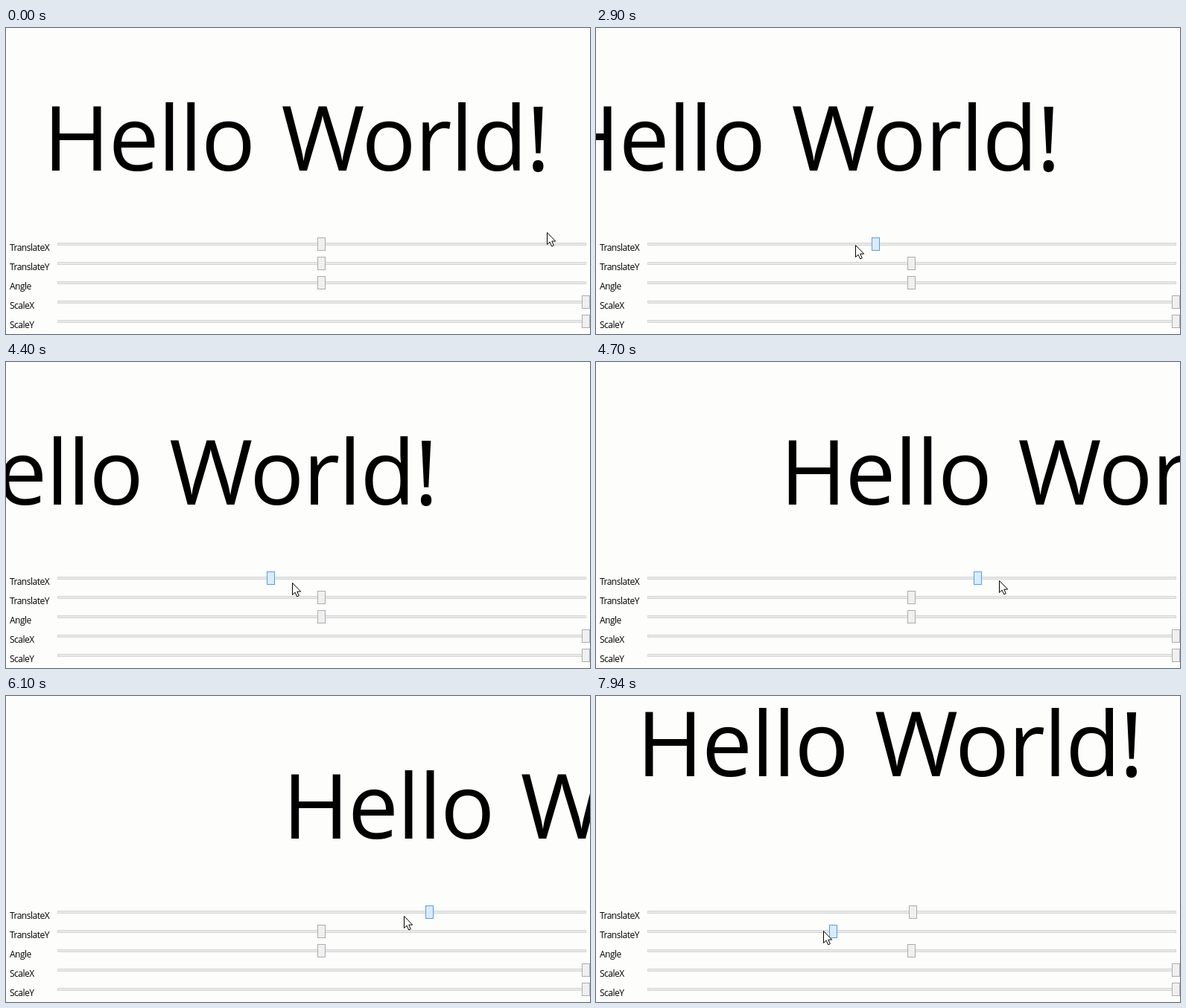
These frames come from a looping animation (784 by 412 pixels, 8 s). An HTML page with a canvas:

```html
<!DOCTYPE html>
<html lang="en">
<head>
<meta charset="utf-8">
<title>Transform sliders</title>
<style>
html, body { margin: 0; width: 100%; height: 100%; overflow: hidden; background: #fdfdfc; }
canvas { display: block; width: 784px; height: 412px; }
</style>
</head>
<body>
<canvas id="stage" width="784" height="412"></canvas>
<script>
const W = 784, H = 412, LOOP = 8000, LAST = 7940;
const HOME = 423.5, HALF = 355;
const LEAD = 70; // the pointer runs this many ms ahead of the dragged thumb
const ctx = document.getElementById('stage').getContext('2d');
const sliders = ['TranslateX', 'TranslateY', 'Angle', 'ScaleX', 'ScaleY'];

// A value that rests between eased strokes [from time, to time, new value].
function strokes(first, ...list) {
  return t => list.reduce((value, [t0, t1, to]) => {
    const u = Math.min(1, Math.max(0, (t - t0) / (t1 - t0)));
    return value + (to - value) * (1 - Math.cos(Math.PI * u)) / 2;
  }, first);
}

const thumbX = strokes(HOME, [2570, 3680, 186], [3808, 5343, 707], [5680, 6569, 406], [6640, 7198, 425.5]);
const thumbY = strokes(HOME, [7480, 8080, 303]);

// Pointer offset from the thumb, and its height on the stage.
const gripX = strokes(303.5, [30, 830, 231], [830, 1250, -412], [1300, 1800, -6], [5340, 5680, 3], [7200, 7480, -3.5]);
const pointerY = strokes(275, [30, 830, 106], [900, 1600, 312], [1600, 1830, 289], [2570, 3430, 297],
  [4400, 5100, 290], [5100, 5340, 296], [7150, 7480, 316]);

function box(x, y, w, h, fill, line) {
  ctx.fillStyle = line;
  ctx.fillRect(x, y, w, h);
  ctx.fillStyle = fill;
  ctx.fillRect(x + 1, y + 1, w - 2, h - 2);
}

function drawTitle(dx, dy) {
  ctx.font = '121px "Open Sans", "Noto Sans", sans-serif';
  ctx.letterSpacing = '-1.6px';
  ctx.fillStyle = '#000';
  ctx.fillText('Hello', 50 + dx, 192 + dy);
  ctx.fillText('World!', 369.5 + dx, 192 + dy);
}

function drawSlider(i, center, active) {
  const mid = 291 + 26 * i;
  ctx.font = '12px "Open Sans", "Noto Sans", sans-serif';
  ctx.letterSpacing = '-0.5px';
  ctx.fillStyle = '#000';
  ctx.fillText(sliders[i], 5, mid + 9);
  box(69, mid - 2, 710, 4, '#e7eaea', '#d6d6d6');
  const left = Math.round(center - 5.5);
  if (active) box(left, mid - 9, 11, 18, '#daecfc', '#569de5');
  else box(left, mid - 9, 11, 18, '#f0f0f0', '#acacac');
}

function drawPointer(x, y) {
  const arrow = [[0, 0], [0, 16], [3.6, 12.6], [6.2, 18.4], [8.8, 17.3], [6.3, 11.6], [11.2, 11.6]];
  ctx.beginPath();
  for (const [px, py] of arrow) ctx.lineTo(x + px - 0.5, y + py + 0.5);
  ctx.closePath();
  ctx.fillStyle = '#fff';
  ctx.fill();
  ctx.strokeStyle = '#000';
  ctx.lineWidth = 1;
  ctx.stroke();
}

function draw(t) {
  const sx = thumbX(t), sy = thumbY(t);
  ctx.fillStyle = '#fdfdfc';
  ctx.fillRect(0, 0, W, H);
  drawTitle((sx - HOME) * W / HALF, (sy - HOME) * 0.8);
  const centers = [sx, sy, HOME, 778.5, 778.5];
  const active = t >= 7430 ? 1 : t >= 2540 && t < 7200 ? 0 : -1;
  centers.forEach((c, i) => drawSlider(i, c, i === active));
  const x = thumbX(t + LEAD) + thumbY(t + LEAD) - HOME + gripX(t);
  drawPointer(Math.round(x), Math.round(pointerY(t)));
}

const start = performance.now();
function tick() {
  draw(Math.min(LAST, (performance.now() - start) % LOOP));
  requestAnimationFrame(tick);
}
tick();
</script>
</body>
</html>
```
